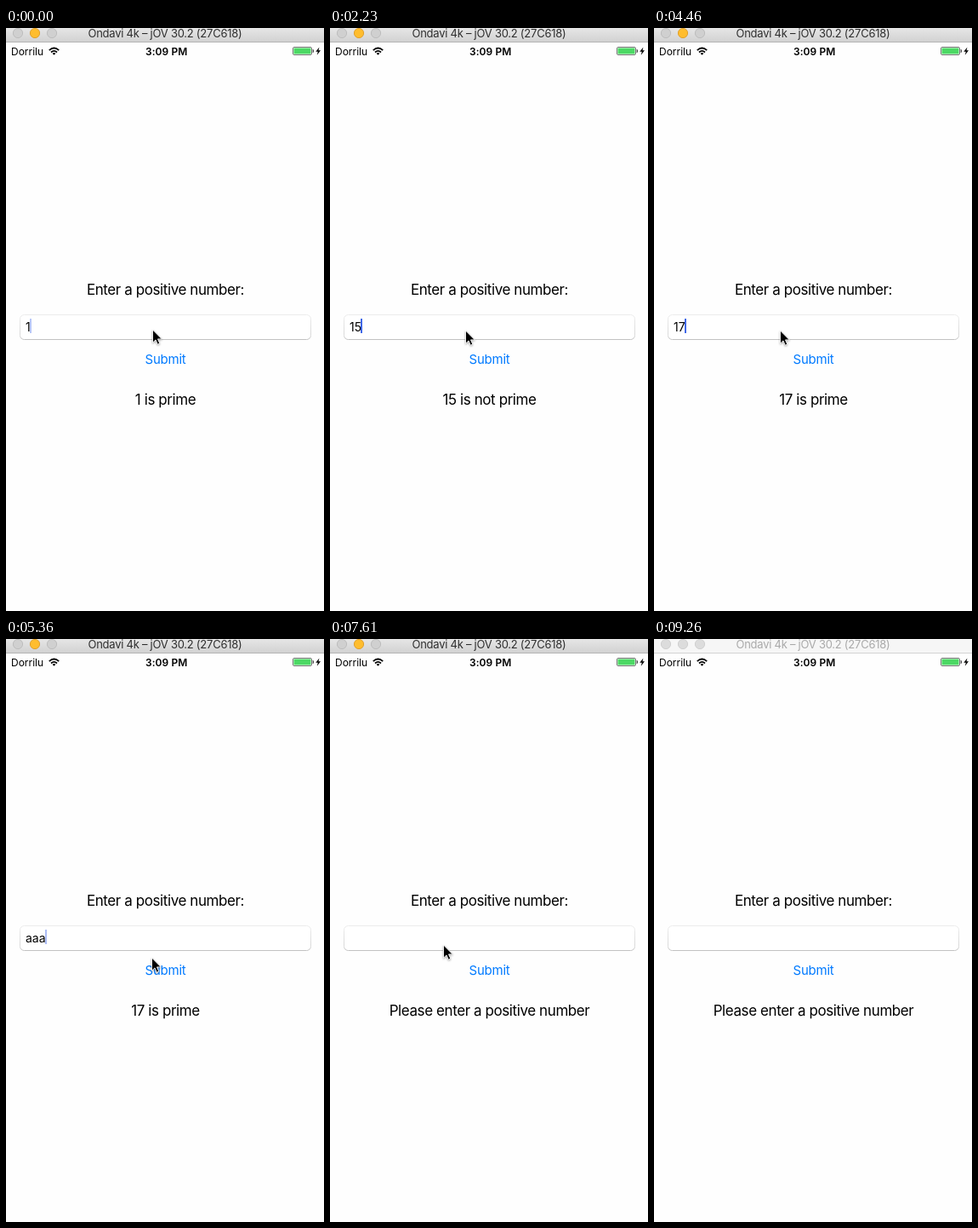
An HTML page for the animation above (9360 ms loop, 374x684 px).

```html
<!DOCTYPE html>
<html lang="en">
<head>
<meta charset="utf-8">
<title>Prime checker</title>
<style>
  html, body { margin: 0; width: 100%; height: 100%; overflow: hidden; background: #fefefe; }
  svg { display: block; width: 100vw; height: 100vh; }
  text { font-family: Inter, Roboto, sans-serif; font-size: 17px; letter-spacing: -.41px; white-space: pre; }
  .mid { text-anchor: middle; }
  .bar { fill: url(#barOn); }
  .edge { stroke: #b4b4b4; }
  .light { fill: #d0d0d0; stroke: #bdbdbd; }
  .yellow { fill: #ffbd2e; stroke: #e0a02c; }
  .title { font-size: 13px; letter-spacing: -.25px; fill: #2e2e2e; }
  .inactive .bar { fill: #f6f6f6; }
  .inactive .edge { stroke: #d3d3d3; }
  .inactive .light { fill: #dcdcdc; stroke: #d0d0d0; }
  .inactive .title { fill: #a9a9a9; }
  .status { font-size: 12px; letter-spacing: 0; }
  .clock { font-weight: 600; letter-spacing: .1px; }
  .submit { font-size: 15px; letter-spacing: -.24px; fill: #007aff; }
  .input { font-size: 14px; letter-spacing: 0; }
  .menu text { font-size: 14px; letter-spacing: -.15px; fill: #fff; }
  .accent { fill: #4068e8; }
  .pointer { filter: drop-shadow(0 1px 1px rgba(0, 0, 0, .35)); }
</style>
</head>
<body>
<svg id="stage" viewBox="0 0 374 684">
  <defs>
    <linearGradient id="barOn" x2="0" y2="1">
      <stop stop-color="#e6e6e6"/><stop offset="1" stop-color="#d2d2d2"/>
    </linearGradient>
    <linearGradient id="rim" x2="0" y2="1">
      <stop stop-color="#ececec"/><stop offset=".8" stop-color="#dadada"/><stop offset="1" stop-color="#c2c2c2"/>
    </linearGradient>
  </defs>
  <rect width="374" height="684" fill="#fefefe"/>

  <rect class="bar" width="374" height="16"/>
  <path class="edge" d="M0 16.5H374"/>
  <circle class="light" cx="14" cy="6" r="5.6"/>
  <circle class="light yellow" id="yellow" cx="34" cy="6" r="5.6"/>
  <circle class="light" cx="54" cy="6" r="5.6"/>
  <text class="title mid" x="187" y="11">Ondavi 4k – jOV 30.2 (27C618)</text>

  <text class="status" x="6" y="31.5">Dorrilu</text>
  <g fill="none" stroke="#000" stroke-width="1.7">
    <path d="M50.8 26.2Q56.5 20.8 62.2 26.2M53 28.5Q56.5 25.3 60 28.5"/>
    <path d="M56.5 31.8L54.6 29.8Q56.5 28.3 58.4 29.8Z" fill="#000" stroke="none"/>
  </g>
  <text class="status clock mid" x="188.7" y="31.5">3:09 PM</text>
  <rect x="337.5" y="22.5" width="22" height="9" rx="1.5" fill="#fff" stroke="#777"/>
  <rect x="338.5" y="23.5" width="20" height="7" rx=".5" fill="#4cd964"/>
  <path d="M361 25.2Q362.4 27 361 28.8Z" stroke="#333" stroke-width=".6"/>
  <path d="M368.4 22.5L364.3 27.8H366.8L365.8 31.8L370 26.3H367.5Z"/>

  <text class="mid" x="187.5" y="313">Enter a positive number:</text>
  <rect x="16.5" y="336.5" width="342" height="29" rx="5" fill="#fff" stroke="url(#rim)"/>
  <g id="selection">
    <rect id="shade" x="23" y="341" height="17" fill="#0054a6" opacity=".2"/>
    <g class="accent">
      <rect x="22" y="341" width="2" height="17"/>
      <circle cx="23" cy="336.5" r="5"/>
    </g>
    <g class="accent" id="handle">
      <rect x="-1" y="341" width="2" height="17"/>
      <circle cy="362" r="5"/>
    </g>
  </g>
  <text class="input" id="input" x="23" y="355.7"></text>
  <rect class="accent" id="caret" y="341" width="2" height="17"/>
  <text class="submit mid" id="submit" x="187.5" y="394">Submit</text>
  <text class="mid" id="result" x="187.5" y="442"></text>

  <g class="menu" id="menu">
    <path fill="#1d1d1d" d="M18 286H172Q180 286 180 294V315Q180 323 172 323H38L29 332L20 323H18Q10 323 10 315V294Q10 286 18 286Z"/>
    <path d="M81.5 286V323" stroke="#777"/>
    <text class="mid" x="46" y="309.5">Select</text>
    <text class="mid" x="131" y="309.5">Select All</text>
  </g>

  <path class="pointer" id="pointer" stroke="#fff" stroke-width=".9"
    d="M.5 0V15.2L4 11.9L6.3 17.2L8.8 16.1L6.5 10.9H11.3Z"/>
</svg>
<script>
const LOOP = 9360, STEP = 149.35, LEAD = 20, KEY = 145;
const el = id => document.getElementById(id);
const [stage, yellow, selection, shade, handle, input, caret, submit, result, menu, pointer] =
  ['stage', 'yellow', 'selection', 'shade', 'handle', 'input', 'caret', 'submit', 'result', 'menu', 'pointer'].map(el);

// each round: select the field's text, type over it, press the button;
// "at" is where the pointer rests meanwhile
const button = [172, 384];
const rounds = [
  { select: -600, type: -600, press: -600, text: '1', at: [172, 354] },
  { select: 300, type: 440, press: 1330, text: '15', at: [172, 354] },
  { select: 2530, type: 2820, press: 3720, text: '17', at: [159, 355] },
  { select: 4760, type: 4910, press: 5660, text: 'aaa', at: [148, 355] },
  { select: 6860, type: 7460, press: 8360, text: '', at: [133, 359] },
  { select: LOOP, type: LOOP, press: 2 * LOOP, text: '', at: [230, -30] }
];

const clamp = v => Math.min(1, Math.max(0, v));
const ramp = (t, a, b) => clamp((t - a) / (b - a));
const mix = (p, q, k) => p.map((v, i) => v + (q[i] - v) * k);

function verdict(text) {
  const n = parseInt(text);
  if (!(n > 0)) return 'Please enter a positive number';
  for (let d = 2; d * d <= n; d++) if (n % d === 0) return `${n} is not prime`;
  return `${n} is prime`;
}

function pointerAt(t) {
  const i = rounds.findIndex(r => t < r.press + 300);
  const last = rounds[i - 1], next = rounds[i];
  const go = ramp(t, next.press - 600, next.press - 150) ** 1.2;
  if (!go) return mix(button, next.at, ramp(t, last.press + 300, next.select - 300));
  const [x, y] = mix(next.at, button, go);
  return [x + 8 * Math.sin(Math.PI * go), y];
}

function caretLevel(t) {
  const phase = 2 * Math.PI * (Math.max(t, 550) - 290) / 1205;
  return clamp(.8 - 2 * Math.cos(phase));
}

function submitLevel(t) {
  const pressed = rounds.findLast(r => r.press <= t);
  return Math.min(1, .25 + (t - pressed.press) / 240);
}

function draw() {
  const now = performance.now() % LOOP;
  const t = Math.floor((now + LEAD) / STEP) * STEP;
  const i = rounds.findLastIndex(r => r.select <= t);
  const round = rounds[i];
  const selected = t < round.type;
  const value = selected ? rounds[i - 1].text : round.text.slice(0, 1 + (t - round.type) / KEY);
  const inactive = t > 9100;

  input.textContent = value;
  result.textContent = verdict(rounds.findLast(r => r.press + 140 <= t).text);
  const width = value ? input.getComputedTextLength() : 0;
  caret.setAttribute('x', Math.round(22.4 + width));
  caret.style.opacity = selected || inactive ? 0 : caretLevel(t);
  selection.style.opacity = +selected;
  shade.setAttribute('width', width);
  handle.setAttribute('transform', `translate(${23 + width})`);
  submit.style.opacity = submitLevel(t);
  menu.style.opacity = t < 440 ? 0 : clamp((740 - t) / 290);
  pointer.setAttribute('transform', `translate(${pointerAt(t).map(Math.round)})`);
  stage.classList.toggle('inactive', inactive);
  yellow.classList.toggle('yellow', !inactive);
  requestAnimationFrame(draw);
}
draw();
</script>
</body>
</html>
```
